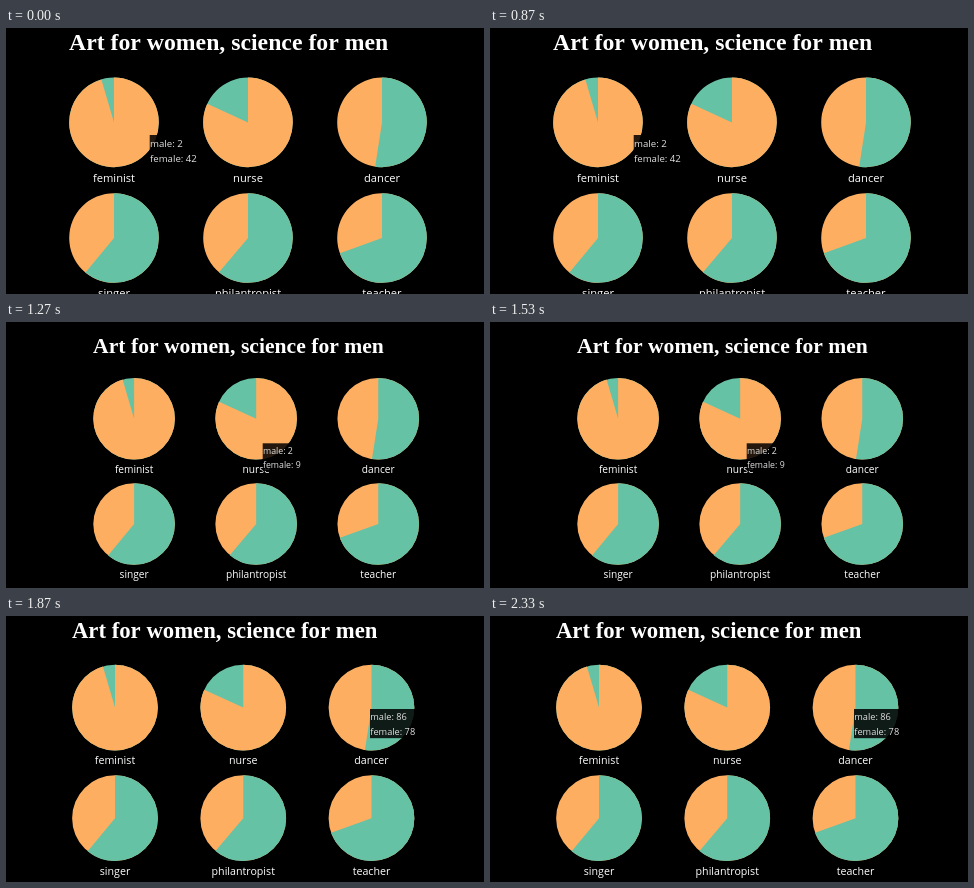
An HTML page with a canvas that plays this animation: 478 by 266 pixels, repeating every 2.79 s.

```html
<!DOCTYPE html>
<html lang="en">
<head>
<meta charset="utf-8">
<title>Pie charts</title>
<style>
  html, body { margin: 0; width: 100%; height: 100%; overflow: hidden; background: #000; }
  canvas { display: block; }
</style>
</head>
<body>
<canvas id="stage" width="478" height="266"></canvas>
<script>
const ctx = document.getElementById('stage').getContext('2d');
const MALE = '#66c2a5', FEMALE = '#fdae61';
const SANS = '"Open Sans", "Noto Sans", sans-serif';
const RADIUS = 44.8, COLUMN = 134, ROW = 115.6;
const VIEW_MS = 930;

// Share of men per word; the larger slice starts at twelve o'clock.
const pies = [
  ['feminist', 2 / 44], ['nurse', 2 / 11], ['dancer', 86 / 164],
  ['singer', 0.61], ['philantropist', 0.612], ['teacher', 0.695]
];

// x, y: centre of the first pie; tip: corner of the tooltip.
const views = [
  { x: 108, y: 94.4, scale: 1, tip: [143.7, 107], width: 48, male: 2, female: 42 },
  { x: 128.1, y: 96.7, scale: 0.911, tip: [256.7, 121.3], width: 43, male: 2, female: 9 },
  { x: 109, y: 91.6, scale: 0.957, tip: [364, 93], width: 48, male: 86, female: 78 }
];

function text(str, x, y, font, color = '#fff', align = 'left') {
  ctx.font = font;
  ctx.fillStyle = color;
  ctx.textAlign = align;
  ctx.fillText(str, x, y);
}

function slice(x, y, from, to, color) {
  const angle = share => (share * 2 - 0.5) * Math.PI;
  ctx.fillStyle = color;
  ctx.beginPath();
  ctx.moveTo(x, y);
  ctx.arc(x, y, RADIUS, angle(from), angle(to));
  ctx.fill();
}

function drawPie([label, male], i) {
  const x = i % 3 * COLUMN, y = Math.floor(i / 3) * ROW;
  const maleFirst = male > 0.5;
  slice(x, y, 0, 1, maleFirst ? FEMALE : MALE);
  slice(x, y, 0, Math.max(male, 1 - male), maleFirst ? MALE : FEMALE);
  text(label, x, y + 59.2, `11.15px ${SANS}`, '#fff', 'center');
}

function drawView({ x, y, scale, tip, width, male, female }) {
  ctx.setTransform(1, 0, 0, 1, 0, 0);
  ctx.clearRect(0, 0, 478, 266);

  ctx.setTransform(scale, 0, 0, scale, x, y);
  text('Art for women, science for men', -45, -72.3,
    'bold 23.75px "Liberation Serif", "Times New Roman", serif');
  pies.forEach(drawPie);

  ctx.setTransform(scale, 0, 0, scale, ...tip);
  ctx.fillStyle = 'rgba(0, 0, 0, 0.86)';
  ctx.fillRect(0, 0, width, 30.5);
  text(`male: ${male}`, 0.3, 11.7, `9.65px ${SANS}`, '#e2e2e2');
  text(`female: ${female}`, 0.3, 27, `9.65px ${SANS}`, '#e2e2e2');
}

function frame() {
  drawView(views[Math.floor(performance.now() / VIEW_MS) % views.length]);
  requestAnimationFrame(frame);
}
frame();
</script>
</body>
</html>
```
